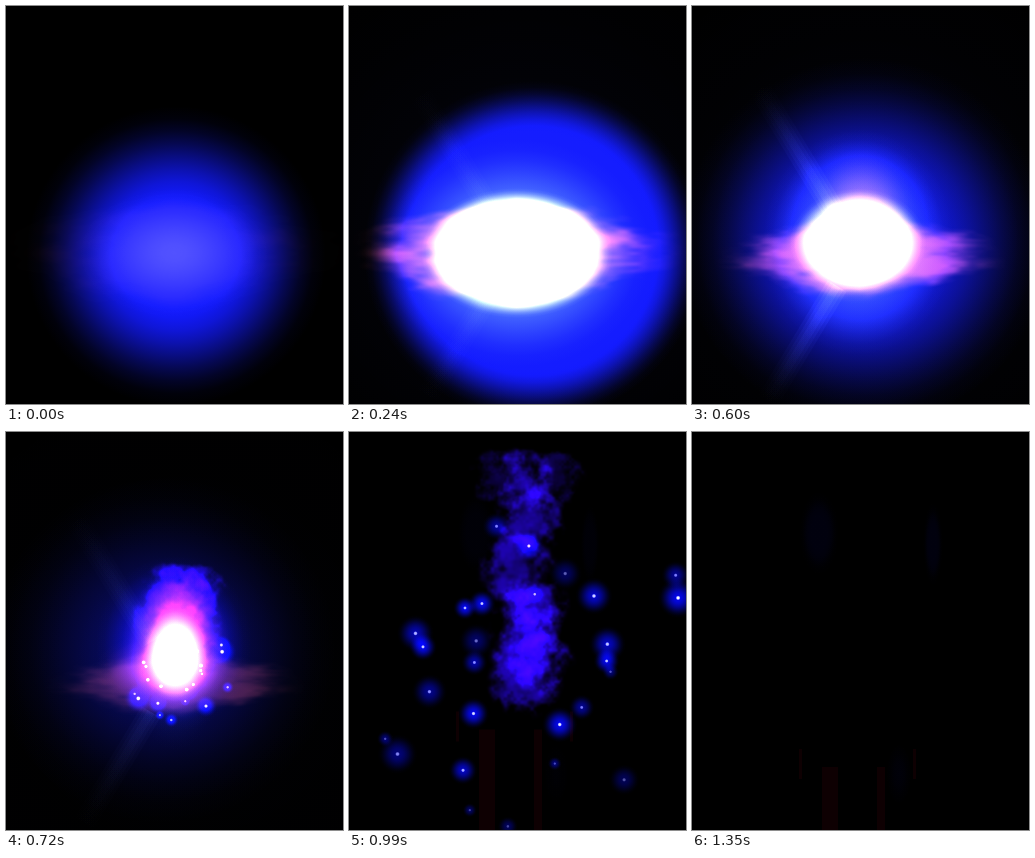
Write an HTML page with a canvas that moves like this. It is 337 px wide and 398 px high and loops after 1.65 s.

```html
<!DOCTYPE html>
<html lang="en">
<head>
<meta charset="utf-8">
<title>Blue explosion</title>
<style>
html, body { margin: 0; width: 100%; height: 100%; overflow: hidden; background: #000; }
canvas { display: block; }
</style>
</head>
<body>
<canvas id="stage" width="337" height="398"></canvas>
<script>
const ctx = document.getElementById('stage').getContext('2d');
const LOOP = 1650, STEP = 30, LAST = 1350;
const PUFFS = 8, SPARKS = 28;

const clamp = v => Math.max(0, Math.min(1, v));
const smooth = v => { v = clamp(v); return v * v * (3 - 2 * v); };
const mix = (a, b, u) => a + (b - a) * u;
const ramp = (t, from, to) => smooth((t - from) / (to - from));

function hash(x, y, seed) {
  const s = Math.sin(x * 127.1 + y * 311.7 + seed * 74.7) * 43758.5453;
  return s - Math.floor(s);
}

function noise(x, y, seed) {
  const ix = Math.floor(x), iy = Math.floor(y);
  const u = smooth(x - ix), v = smooth(y - iy);
  return mix(
    mix(hash(ix, iy, seed), hash(ix + 1, iy, seed), u),
    mix(hash(ix, iy + 1, seed), hash(ix + 1, iy + 1, seed), u), v);
}

const fbm = (x, y, seed) =>
  (noise(x, y, seed) * 4 + noise(x * 2, y * 2, seed + 1) * 2 + noise(x * 4, y * 4, seed + 2)) / 7;

// Builds a tinted sprite; alphaAt receives coordinates from -1 to 1.
function sprite(w, h, rgb, alphaAt) {
  const c = document.createElement('canvas');
  c.width = w;
  c.height = h;
  const g = c.getContext('2d'), img = g.createImageData(w, h);
  for (let y = 0, p = 0; y < h; y++) {
    for (let x = 0; x < w; x++, p += 4) {
      img.data.set(rgb, p);
      img.data[p + 3] = 255 * clamp(alphaAt(x / w * 2 - 1, y / h * 2 - 1));
    }
  }
  g.putImageData(img, 0, 0);
  return c;
}

const puffSprites = [3, 11, 19, 27].map(seed => sprite(110, 110, [42, 4, 255], (x, y) => {
  const n = fbm(x * 3 + 9, y * 3 + 9, seed), r = Math.hypot(x, y);
  return smooth((1 - r) * 1.5 + (n - 0.55) * 1.6) * smooth((1 - r) * 4) * (0.35 + n * 0.85);
}));

// Streaks that narrow towards both tips.
const flameSprites = [5, 16].map(seed => sprite(330, 120, [255, 92, 100], (x, y) => {
  const side = Math.abs(x), n = fbm(x * 4 + 20, y * (3 + 2 * side) + 20, seed);
  const body = 1.05 - side ** 1.3 - y * y * (0.9 + side);
  return smooth(body * 1.3 + (n - 0.5) * 0.9) * smooth((1 - side) * 2.5) * smooth((1 - Math.abs(y)) * 3);
}));

function drawSprite(img, x, y, rx, ry, alpha) {
  if (alpha <= 0) return;
  ctx.globalAlpha = clamp(alpha);
  ctx.drawImage(img, x - rx, y - ry, rx * 2, ry * 2);
  ctx.globalAlpha = 1;
}

// Soft ellipse that stays full up to the plateau and then eases to nothing.
function glow(x, y, rx, ry, rgb, alpha, plateau = 0) {
  if (alpha <= 0.003) return;
  const g = ctx.createRadialGradient(0, 0, 0, 0, 0, 1);
  for (let i = 0; i <= 8; i++) {
    const a = alpha * (1 - smooth(i / 8));
    g.addColorStop(mix(plateau, 1, i / 8), `rgba(${rgb},${a.toFixed(4)})`);
  }
  ctx.save();
  ctx.translate(x, y);
  ctx.scale(rx, ry);
  ctx.fillStyle = g;
  ctx.beginPath();
  ctx.arc(0, 0, 1, 0, 7);
  ctx.fill();
  ctx.restore();
}

function ray(x0, y0, x1, y1, alpha) {
  const g = ctx.createLinearGradient(x0, y0, x1, y1);
  g.addColorStop(0, `rgba(130,150,255,${alpha})`);
  g.addColorStop(1, 'rgba(70,80,220,0)');
  ctx.strokeStyle = g;
  for (const width of [22, 15, 8]) {
    ctx.lineWidth = width;
    ctx.beginPath();
    ctx.moveTo(x0, y0);
    ctx.lineTo(x1, y1);
    ctx.stroke();
  }
}

function drawHalo(t, rise, settle) {
  const fade = ramp(t, 480, 870);
  const r = 150 + 20 * rise + 20 * settle - 25 * fade;
  const plateau = Math.max(0, 0.33 + 0.37 * rise - 0.24 * settle - 0.6 * fade);
  glow(170 + 15 * rise - 3 * settle - 38 * fade, 250 - 5 * rise - 40 * fade, r, r,
    '18,26,255', (1 - fade) ** 0.8, plateau);
  glow(175, 225, 320, 320, '70,80,255', 0.05 * rise * (1 - fade));

  const beam = 0.1 * ramp(t, 120, 480) * (1 - fade);
  if (beam > 0) {
    ray(145, 210, 66, 80, beam);
    ray(145, 280, 74, 398, beam);
  }
}

function drawFlame(t, settle) {
  const fade = ramp(t, 510, 840);
  const alpha = mix(0.05, 0.9, ramp(t, 0, 180)) * (1 - fade);
  const rx = 172 - 16 * settle - 32 * fade, ry = 62 - 8 * settle - 22 * fade;
  const y = 247 + 3 * fade;
  drawSprite(flameSprites[0], 167, y, rx, ry, alpha * (1 - settle));
  drawSprite(flameSprites[1], 167, y, rx, ry, alpha * settle);
}

function drawCore(t, rise, settle) {
  const shrink = ramp(t, 480, 780), fade = ramp(t, 700, 850);
  const ember = ramp(t, 540, 660) * (1 - ramp(t, 690, 850));
  glow(168, 212, 78, 88, '15,10,255', ember * 0.85, 0.15);
  glow(170, 214, 54, 72, '255,80,130', ember * 0.9, 0.1);
  glow(160, 238, 72, 38, '255,80,130', ember * 0.55);

  const x = 168 - 4 * settle + 6 * shrink, y = 247 - 2 * settle - 25 * shrink;
  const rx = mix(96 - 6 * settle, 28, shrink), ry = mix(65 - 7 * settle, 46, shrink);
  glow(x, y, rx * 1.4, ry * (1.75 + 0.35 * settle), '85,130,255', 0.85 * rise * (1 - shrink), 0.25);
  glow(x, y, rx, ry, '255,255,255', mix(0.2, 1, ramp(t, 0, 120)) * (1 - fade),
    mix(0.68 * rise, 0.35, shrink));
}

// The column climbs from the core, then its head tears away from the base.
function drawSmoke(t) {
  const fade = ramp(t, 570, 680) * mix(1, 0.42, ramp(t, 850, 1110)) * (1 - ramp(t, 1080, 1320));
  if (fade <= 0) return;
  const climb = clamp((t - 570) / 300), drift = Math.max(0, (t - 870) / 240);
  for (let i = 0; i < PUFFS; i++) {
    const h = i / (PUFFS - 1);
    const x = 174 + 9 * Math.sin(i * 2.4) + drift * 20 * h;
    const y = mix(230, mix(98, 236, h), climb) + drift * mix(-98, 28, smooth(h * 2.4));
    const r = 37 + 3 * (i % 3);
    drawSprite(puffSprites[i % 4], x, y, r, r, fade);
  }
  for (const side of [-1, 1]) {
    const x = 178 + side * 30 * climb, y = mix(230, 86, climb) - drift * 82;
    drawSprite(puffSprites[side + 1], x, y, 31, 31, fade * 0.42);
  }
}

// Sparks fly straight out from the core at constant speed.
function drawSparks(t) {
  const spread = (t - 605) / 265;
  if (spread <= 0) return;
  const scale = Math.min(1.2, 0.7 + 0.4 * spread);
  for (let i = 0; i < SPARKS; i++) {
    const angle = i * 2.4, reach = mix(25, 135, hash(i, 1, 7) ** 0.8) * spread;
    const size = hash(i, 2, 7), end = 1060 + 260 * hash(i, 3, 7) ** 2;
    const x = 168 + Math.cos(angle) * reach;
    const y = 229 + Math.sin(angle) * reach * 0.85 + 17 * Math.max(0, 1 - spread);
    const light = clamp((end - t) / 200), r = mix(5, 17, size) * scale;
    glow(x, y, r, r, '5,8,255', 0.88 * light, 0.08);
    const dot = 1.6 + size;
    glow(x, y, dot, dot, '255,255,255', light * mix(0.5, 1, size), 0.3);
  }
}

function drawResidue(t) {
  const show = ramp(t, 750, 900);
  if (!show) return;
  const top = mix(260, 335, ramp(t, 870, 1110));
  ctx.fillStyle = `rgba(255,0,30,${0.055 * show})`;
  for (const [x, width] of [[130, 16], [185, 8]]) ctx.fillRect(x, top, width, 398 - top);
  for (const x of [107, 221]) ctx.fillRect(x, top - 18, 3, 30);
  const blue = 0.055 * ramp(t, 870, 1110);
  glow(127, 101, 20, 42, '20,20,255', blue, 0.4);
  glow(241, 112, 10, 42, '20,20,255', blue, 0.4);
  glow(207, 342, 14, 34, '20,20,255', blue * 0.7);
}

function draw(t) {
  const rise = ramp(t, 0, 240), settle = ramp(t, 240, 480);
  ctx.globalCompositeOperation = 'source-over';
  ctx.fillStyle = '#000';
  ctx.fillRect(0, 0, 337, 398);
  ctx.globalCompositeOperation = 'lighter';
  drawHalo(t, rise, settle);
  drawResidue(t);
  drawSmoke(t);
  drawFlame(t, settle);
  drawCore(t, rise, settle);
  drawSparks(t);
}

const start = performance.now();

function tick() {
  const t = (performance.now() - start) % LOOP;
  draw(Math.min(LAST, Math.floor(t / STEP) * STEP));
  requestAnimationFrame(tick);
}

tick();
</script>
</body>
</html>
```
